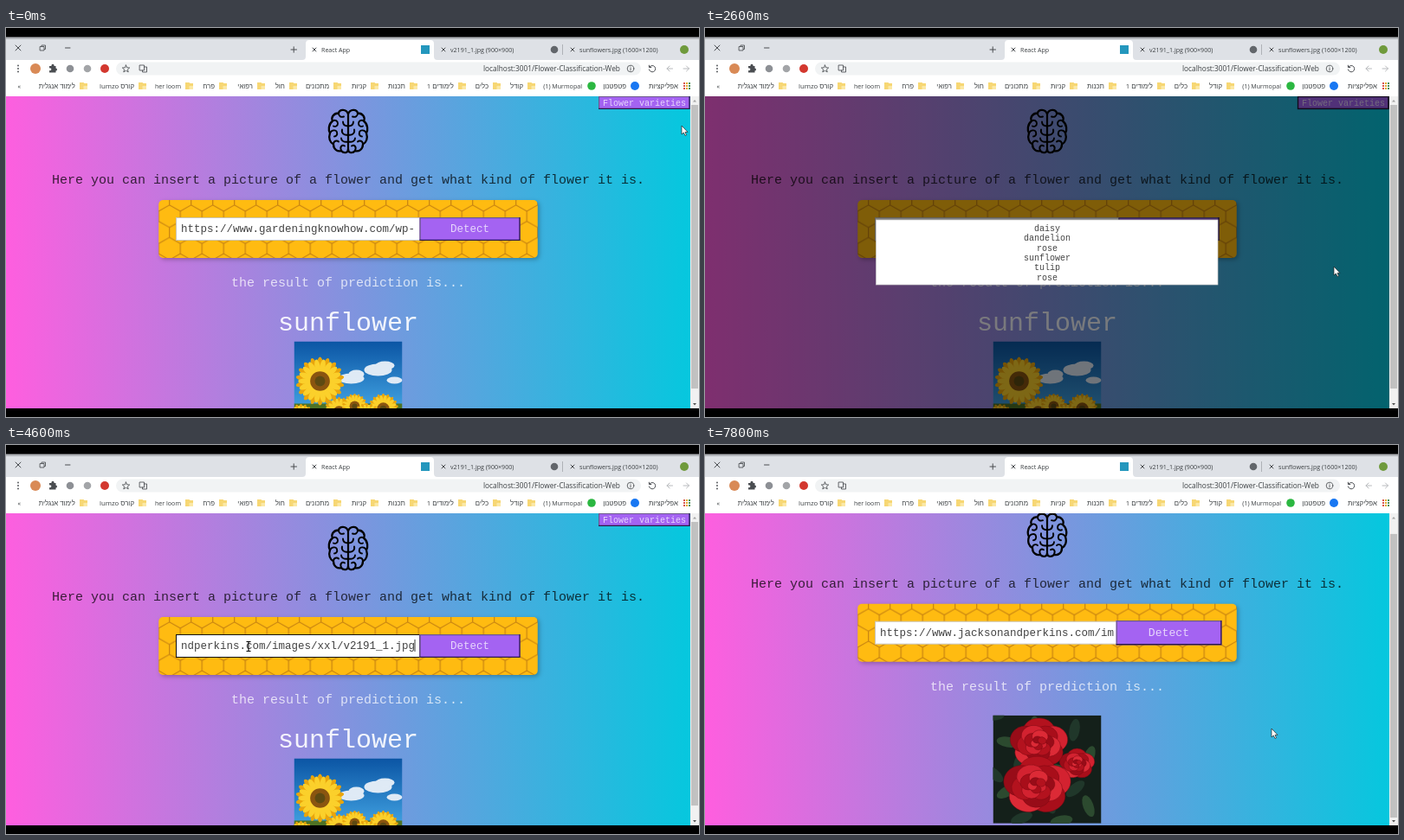
An HTML page for the animation above (8000 ms loop, 800 by 450 pixels).

```html
<!DOCTYPE html>
<html lang="en">
<head>
<meta charset="utf-8">
<title>Flower classification</title>
<style>
html, body { margin: 0; width: 100%; height: 100%; overflow: hidden; background: #000; }
svg { display: block; width: 800px; height: 450px; }
text { white-space: pre; }
.ui { font-family: "Open Sans", "Noto Sans", "Liberation Sans", "DejaVu Sans", sans-serif; font-size: 7.1px; fill: #3c4043; }
.mono { font-family: "Liberation Mono", "Courier New", monospace; fill-opacity: .74; }
.line { fill: none; stroke: #4a4d51; stroke-width: 1; stroke-linecap: round; stroke-linejoin: round; }
.thin { stroke-width: .85; }
.faint { stroke: #b8babd; }
.raised { fill: none; stroke: #6d5a8c; stroke-width: 1.2; }
.shaded { fill: none; stroke: #2c1a48; stroke-width: 1.3; }
</style>
</head>
<body>
<svg viewBox="0 0 800 450" xmlns="http://www.w3.org/2000/svg">
  <defs>
    <linearGradient id="pageFill" gradientUnits="userSpaceOnUse" x1="-3" y1="274" x2="793" y2="260">
      <stop stop-color="#ff5edf"/><stop offset="1" stop-color="#04c8de"/>
    </linearGradient>
    <linearGradient id="sky" x2="0" y2="1">
      <stop stop-color="#0b55a4"/><stop offset=".6" stop-color="#3f9fdf"/>
    </linearGradient>
    <pattern id="comb" width="40" height="60" patternUnits="userSpaceOnUse" patternTransform="translate(176.25 199) scale(.625)">
      <rect width="40" height="60" fill="#fb1"/>
      <path d="M20 -10V9.2L0 20.8V39.2L20 50.8V70M20 9.2L40 20.8V39.2L20 50.8" fill="none" stroke="#b71" stroke-width="1.6"/>
    </pattern>
    <clipPath id="view"><rect y="79" width="790" height="361"/></clipPath>
    <clipPath id="photoBox"><rect width="125" height="125"/></clipPath>
    <g id="folder"><path d="M-4.5 4V-4H0L1 -3H4.5V4Z" fill="#f7d774"/><path d="M0 4V0H4.5V4Z" fill="#fbe8a6"/></g>
    <path id="close" class="line" d="M-2 -2L2 2M2 -2L-2 2"/>
    <g id="halfBrain" fill="none" stroke="#000" stroke-width="2.3" stroke-linecap="round" stroke-linejoin="round">
      <path d="M0 5C-2 -1 -10 -1 -11 4C-17 4 -20 9 -18 13C-23 17 -23 24 -21 27C-23 33 -21 38 -17 40C-17 46 -12 49 -8 47.5C-5 51 0 50 0 46"/>
      <path stroke-width="1.9" d="M-11 4C-11 8 -8 9 -5 8M-18 13C-15 11 -12 13 -12 16M-6 14C-6 18 -4 19 0 19M-21 27C-19 23 -14 23 -13 26C-12 29 -14 31 -16 31M-7 23C-8 27 -5 30 0 29M-17 40C-17 36 -13 35 -11 37M-8 47C-10 43 -7 40 -4 42M-8 33C-8 36 -5 38 0 37M-12 16C-12 19 -15 20 -17 19"/>
    </g>
  </defs>

  <g id="browser">
    <rect y="10" width="800" height="430" fill="#fff"/>
    <rect y="10" width="800" height="27" fill="#dee1e6"/>
    <rect y="10" width="800" height="3" fill="#b4b7bc"/>
    <path d="M342 37Q346 37 346 33V18Q346 14 350 14H490Q494 14 494 18V33Q494 37 498 37Z" fill="#fff"/>
    <path d="M642.5 19V31" stroke="#9a9da2" stroke-width=".7"/>
    <path class="line" d="M11 20L17 26M17 20L11 26M68.5 23H74M329 25H335.5M332.2 21.8V28.2"/>
    <path class="line thin" d="M39.5 21.5H44V26H39.5ZM41 21V20H45.5V24.5H44.5"/>
    <rect x="479" y="20" width="10" height="10" fill="#2497bd"/>
    <circle cx="633" cy="25" r="4.3" fill="#62666b"/>
    <circle cx="783" cy="25" r="5" fill="#6f9a3c"/>

    <rect x="127" y="39.5" width="606" height="15" rx="7.5" fill="#f1f3f4"/>
    <g fill="#4a4d51"><circle cx="14" cy="43.5" r=".9"/><circle cx="14" cy="47" r=".9"/><circle cx="14" cy="50.5" r=".9"/></g>
    <circle cx="34" cy="47" r="6" fill="#d98a56"/>
    <path d="M50 44H52.5A1.6 1.6 0 1 1 55.5 44H57.5V46.5A1.5 1.5 0 1 1 57.5 49.5V51.5H50V49A1.5 1.5 0 1 0 50 46.5Z" fill="#4a4d51"/>
    <circle cx="74" cy="47" r="4.3" fill="#8d9095"/>
    <circle cx="94" cy="47" r="4.3" fill="#a3a5a8"/>
    <circle cx="114" cy="47" r="5" fill="#d3382f"/>
    <path class="line thin" d="M138.5 43L139.7 45.8L142.7 46L140.4 48L141.2 51L138.5 49.3L135.8 51L136.6 48L134.3 46L137.3 45.8Z"/>
    <path class="line thin" d="M154.5 43H159.5V49H154.5ZM159.5 45H162.5V51H157.5V49"/>
    <circle class="line thin" cx="721" cy="47" r="3.8"/>
    <path class="line thin" d="M721 46.5V49M721 45V45.1"/>
    <path class="line" d="M743 45A3.7 3.7 0 1 1 742.4 48M742.4 43.2V45.5H744.8"/>
    <path class="line faint" d="M763 47H769.5M766 44L763 47L766 50M782 47H788.5M785.5 44L788.5 47L785.5 50"/>
    <text class="ui" x="551" y="50" style="font-size:8.3px">localhost:3001/Flower-Classification-Web</text>

    <circle cx="726" cy="67" r="5" fill="#1877f2"/>
    <circle cx="676" cy="67" r="4.8" fill="#2bb741"/>
  </g>

  <g clip-path="url(#view)">
    <rect y="79" width="790" height="361" fill="url(#pageFill)"/>
    <g id="content">
      <rect x="684" y="79" width="105.5" height="15" fill="#a463f2"/>
      <path class="raised" d="M684.6 94V79.5H789"/>
      <path class="shaded" d="M684 93.4H789V79"/>
      <text class="mono" x="689" y="89.7" font-size="10" fill="#fff">Flower varieties</text>
      <g transform="translate(395 94.5)">
        <use href="#halfBrain"/><use href="#halfBrain" transform="scale(-1 1)"/>
        <path d="M0 5V46" stroke="#000" stroke-width="2.2"/>
      </g>
      <text class="mono" x="53" y="180" font-size="15">Here you can insert a picture of a flower and get what kind of flower it is.</text>
      <rect x="176.25" y="199" width="437.5" height="67" rx="5" style="filter:drop-shadow(2.5px 2.5px 2.5px rgba(0,0,0,.25))" fill="url(#comb)"/>
      <rect id="field" x="196.5" y="219.5" width="281" height="26" fill="#fff"/>
      <rect id="selection" x="201.5" y="225" width="271" height="15" fill="#0078d7"/>
      <text id="address" class="mono" x="202" y="236" font-size="12.5"></text>
      <path id="caret" stroke="#000" stroke-width=".8"/>
      <g id="detect">
        <rect x="477.5" y="219" width="116" height="27" fill="#a463f2"/>
        <path class="raised" d="M478.1 246V219.6H593"/>
        <path class="shaded" d="M477.5 245.4H593V219"/>
        <text class="mono" x="513" y="236" font-size="12.5" fill="#fff">Detect</text>
      </g>
      <text class="mono" x="260" y="299" font-size="15" fill="#fff">the result of prediction is...</text>
      <g id="sunflowerResult">
        <text class="mono" x="314" y="350" font-size="30" fill="#fff" style="fill-opacity:.9">sunflower</text>
        <g transform="translate(332.5 362.5)" clip-path="url(#photoBox)">
          <rect width="125" height="125" fill="url(#sky)"/>
          <g fill="#dfeaf5"><ellipse cx="66" cy="43" rx="15" ry="6"/><ellipse cx="72" cy="38" rx="9" ry="5"/><ellipse cx="97" cy="33" rx="16" ry="7"/><ellipse cx="105" cy="28" rx="11" ry="5"/><ellipse cx="116" cy="45" rx="9" ry="4"/></g>
          <rect y="72" width="125" height="53" fill="#4f7325"/>
          <g id="sunflowers"></g>
        </g>
      </g>
      <g id="roseResult" transform="translate(332.5 328)" clip-path="url(#photoBox)">
        <rect width="125" height="125" fill="#14201a"/>
        <g id="leaves"></g>
        <g id="roses"></g>
      </g>
    </g>
    <g id="modal">
      <rect y="79" width="790" height="361" opacity=".5"/>
      <rect x="684.5" y="79.5" width="104.5" height="14" fill="none" stroke="#120a1c" stroke-width="1.3"/>
      <rect x="197.5" y="222" width="394.5" height="75" fill="#fff" stroke="#ccc" stroke-width=".7"/>
      <g id="varieties" class="mono" font-size="10" text-anchor="middle"></g>
    </g>
  </g>

  <rect x="790" y="79" width="10" height="361" fill="#f1f1f1"/>
  <path d="M793 85.5L795 83L797 85.5Z" fill="#a3a3a3"/>
  <path d="M793 434L795 436.5L797 434Z" fill="#505050"/>
  <rect id="thumb" x="791" width="8" fill="#c1c1c1"/>

  <path id="arrow" d="M0 0V10L2.3 8L4 11.5L5.5 10.8L4 7.4H7Z" fill="#fff" stroke="#222" stroke-width=".7"/>
  <path id="beam" d="M-2.5 -5.5H2.5M-2.5 5.5H2.5M0 -5.5V5.5" fill="none" stroke="#000" stroke-width="1.1"/>
  <path id="hand" d="M-1 0Q0 -1 1 0V4.500L5 5.500Q6 6 5.800 8L5 12H-.5L-3.500 7.500Q-3.500 6 -1 7.500Z" fill="#fff" stroke="#222" stroke-width=".7"/>

  <rect width="800" height="10.5"/>
  <rect y="440" width="800" height="10"/>
</svg>
<script>
const LOOP = 8000, STEP = 100;
const MODAL_OPEN = 400, MODAL_CLOSE = 2800, FOCUS = 3400, SELECT_ALL = 3800,
      PASTE = 4600, HOVER = 5300, CLICK = 5900, RESULT = 6000, SCROLL = 7300;
const SCROLL_RANGE = 15.3, SCROLL_TIME = 300;
const OLD_URL = "https://www.gardeningknowhow.com/wp-";
const NEW_URL = "https://www.jacksonandperkins.com/images/xxl/v2191_1.jpg";
const VISIBLE_CHARS = 36;

const $ = id => document.getElementById(id);
const add = (id, markup) => $(id).insertAdjacentHTML("beforeend", markup);
const range = n => [...Array(n).keys()];
const show = (id, on) => $(id).setAttribute("display", on ? "inline" : "none");
const place = (id, x, y) => $(id).setAttribute("transform", `translate(${x} ${y})`);
const between = (t, a, b) => t >= a && t < b;
const progress = (t, start, time) => Math.min(1, Math.max(0, (t - start) / time));
const ease = p => p * p * (3 - 2 * p);
const easeOut = p => 1 - (1 - p) ** 2;

// Browser labels
[[364, "React App"], [513, "v2191_1.jpg (900×900)"], [662, "sunflowers.jpg (1600×1200)"]].forEach(([x, label]) =>
  add("browser", `<use href="#close" x="${x - 8}" y="25"/><text class="ui" x="${x}" y="27.5">${label}</text>`));

const bookmark = (x, label) => {
  const size = /[א-ת]/.test(label) ? 7.8 : 7.1;
  add("browser", `<text class="ui" x="${x}" y="69.5" text-anchor="end" style="font-size:${size}px">${label}</text>`);
};
[[776, "אפליקציות"], [716, "פטפטנון"], [665, "(1) Murmopal"], [17, "«"]].forEach(b => bookmark(...b));
[[597, "קודל"], [557, "כלים"], [517, "לימודים 1"], [461, "תכנות"], [416, "קניות"], [373, "מתכונים"], [322, "חול"],
 [285, "רפואי"], [241, "פרח"], [202, "her loom"], [148, "lumzo קורס"], [80, "לימוד אנגלית"]].forEach(([x, label]) => {
  bookmark(x, label);
  add("browser", `<use href="#folder" x="${x + 9.5}" y="67"/>`);
});
range(9).forEach(i => add("browser",
  `<rect x="${782 + i % 3 * 3}" y="${63 + Math.floor(i / 3) * 3}" width="2" height="2" fill="${["#d9534a", "#e0a92e", "#4a8f57"][i % 3]}"/>`));

["daisy", "dandelion", "rose", "sunflower", "tulip", "rose"].forEach((name, i) =>
  add("varieties", `<text x="395" y="${235 + i * 11.3}">${name}</text>`));

// Photos
const petals = (n, r, w, fill) => range(n).map(i =>
  `<ellipse cy="${-r * .68}" rx="${w}" ry="${r * .36}" fill="${fill}" transform="rotate(${i * 360 / n})"/>`).join("");
[[52, 82, 17], [70, 75, 14], [103, 78, 17], [84, 88, 16], [8, 88, 15], [30, 46, 27]].forEach(([x, y, r]) =>
  add("sunflowers", `<g transform="translate(${x} ${y})">${petals(18, r, r * .13, "#e9a50c")}
    <g transform="rotate(10)">${petals(18, r * .9, r * .12, "#fbd02b")}</g>
    <circle r="${r * .42}" fill="#8a5510"/><circle r="${r * .22}" fill="#5d4a12"/></g>`));

range(16).forEach(i => {
  const x = i * 47 % 125, y = i * 71 % 125;
  add("leaves", `<ellipse cx="${x}" cy="${y}" rx="13" ry="6" fill="${i % 2 ? "#2c4a2f" : "#20372a"}" transform="rotate(${i * 50} ${x} ${y})"/>`);
});
const reds = ["#b3121e", "#d32230", "#a80e1a", "#dc2a36", "#980c18"];
const rosePetals = (r, layer) => range(5).map(i =>
  `<ellipse cy="${-r * .48}" rx="${r * .5}" ry="${r * .46}" fill="${reds[(layer * 2 + i) % 5]}" stroke="#7c0912" stroke-width=".5" transform="rotate(${i * 72 + layer * 40})"/>`).join("");
[[97, 56, 22], [53, 32, 36], [51, 81, 42]].forEach(([x, y, r]) =>
  add("roses", `<g transform="translate(${x} ${y}) scale(1 .85)">${range(4).map(i => rosePetals(r * (1 - i * .24), i)).join("")}</g>`));

// Pointer path: time, x, y
const path = [[0, 780, 113], [300, 784, 85], [800, 784, 85], [1400, 550, 240], [1700, 606, 225], [1800, 721, 287],
  [1900, 721, 287], [2200, 726, 276], [2800, 726, 276], [3300, 462, 238], [3700, 462, 238], [4100, 374, 236],
  [4200, 280, 233], [4900, 280, 233], [5500, 557.5, 234], [6700, 557.5, 234], [7200, 654, 328], [LOOP, 654, 328]];
function pointerAt(t) {
  const i = path.findIndex((p, k) => t < path[k + 1][0]);
  const [t0, x0, y0] = path[i], [t1, x1, y1] = path[i + 1], p = ease((t - t0) / (t1 - t0));
  return [x0 + (x1 - x0) * p, y0 + (y1 - y0) * p];
}

function drawPointer(t, modal) {
  const [x, y] = pointerAt(t), inRow = !modal && y > 219 && y < 246;
  const kind = inRow && x > 477 && x < 594 ? "hand" : inRow && x > 196 && x < 478 ? "beam" : "arrow";
  for (const id of ["arrow", "beam", "hand"]) show(id, id === kind);
  place(kind, x, y);
}

function drawForm(t) {
  const focused = between(t, FOCUS, CLICK), selected = between(t, SELECT_ALL, PASTE), pasted = t >= PASTE;
  const url = pasted ? NEW_URL : OLD_URL;
  $("field").setAttribute("stroke", focused ? "#111" : "#c9c4b4");
  $("address").textContent = focused ? url.slice(-VISIBLE_CHARS) : url.slice(0, VISIBLE_CHARS);
  $("address").setAttribute("fill", selected ? "#fff" : "#000");
  show("selection", selected);
  const sinceEdit = t - (pasted ? PASTE : FOCUS);
  show("caret", focused && !selected && Math.floor(sinceEdit / 500) % 2 === 0);
  $("caret").setAttribute("d", `M${pasted ? 472 : 457} 225V239`);

  const pressed = between(t, CLICK, CLICK + 100);
  const scale = pressed ? .95 : 1 + .05 * easeOut(progress(t, HOVER, 250));
  $("detect").setAttribute("transform", `translate(535.5 232.5) scale(${scale}) translate(-535.5 -232.5)`);
}

function drawScroll(t) {
  const scroll = SCROLL_RANGE * easeOut(progress(t, SCROLL, SCROLL_TIME));
  const track = 342, view = 361, total = view + SCROLL_RANGE;
  place("content", 0, -scroll);
  $("thumb").setAttribute("y", 89 + scroll * track / total);
  $("thumb").setAttribute("height", track * view / total);
}

function render(now) {
  const t = Math.floor(now % LOOP / STEP) * STEP;
  const modal = between(t, MODAL_OPEN, MODAL_CLOSE), done = t >= RESULT;
  show("modal", modal);
  show("sunflowerResult", !done);
  show("roseResult", done);
  drawForm(t);
  drawScroll(t);
  drawPointer(t, modal);
}

const start = performance.now();
function tick() {
  render(performance.now() - start);
  requestAnimationFrame(tick);
}
tick();
</script>
</body>
</html>
```
